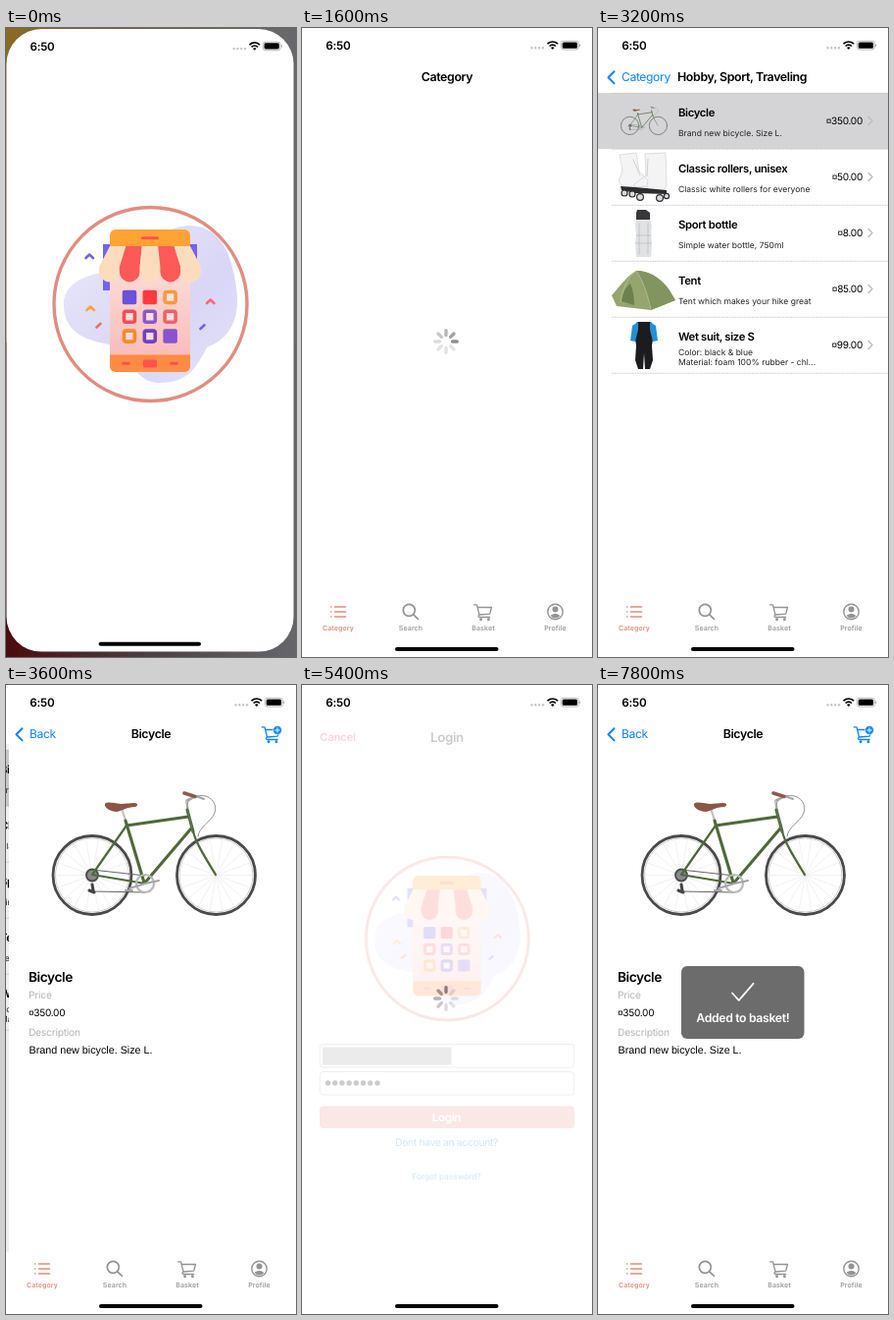
Animation of 296 by 640 pixels, one loop 8 s. Source, as an HTML page:

```html
<!DOCTYPE html>
<html lang="en">
<head>
<meta charset="utf-8">
<title>Shop app walkthrough</title>
<style>
html, body { margin: 0; width: 100%; height: 100%; overflow: hidden; background: #fff; }
svg { display: block; width: 296px; height: 640px; }
text { font-family: Inter, sans-serif; letter-spacing: -.03em; white-space: pre; text-rendering: geometricPrecision; }
.mid { text-anchor: middle; }
.end { text-anchor: end; }
.nav { font-size: 12.4px; }
.nav.blue { font-size: 12.1px; }
.bold { font-weight: 600; }
.blue { fill: #0a84ff; }
.row { font-size: 11.3px; font-weight: 600; }
.note { font-size: 8.55px; letter-spacing: 0; fill: #222; }
.price { font-size: 10.1px; }
.coin { font-family: "Liberation Sans", sans-serif; }
.label { font-size: 10.2px; letter-spacing: -.02em; fill: #b4b4b6; }
.body { font: 10.75px "Liberation Sans", sans-serif; letter-spacing: 0; }
.hint { font-size: 12.15px; fill: #c4c4c7; }
.tab { font-size: 7px; font-weight: 600; letter-spacing: .1px; text-anchor: middle; fill: #9b9b9b; }
.line { fill: none; stroke-linecap: round; stroke-linejoin: round; }
</style>
</head>
<body>
<svg viewBox="0 0 296 640">
<defs>
  <linearGradient id="wallTop"><stop stop-color="#8a6a24"/><stop offset=".5" stop-color="#6f6250"/><stop offset="1" stop-color="#68686c"/></linearGradient>
  <linearGradient id="wallLow"><stop stop-color="#4c0c0c"/><stop offset=".5" stop-color="#4a4044"/><stop offset="1" stop-color="#66666a"/></linearGradient>
  <linearGradient id="blob" x2="1" y2="1"><stop stop-color="#ebe9fa"/><stop offset=".6" stop-color="#d9d6f6"/><stop offset="1" stop-color="#e4e1f9"/></linearGradient>
  <linearGradient id="glass" x2="0" y2="1"><stop stop-color="#fde3dc"/><stop offset="1" stop-color="#f9bdbb"/></linearGradient>
  <clipPath id="face"><circle cx="258.5" cy="594" r="6.4"/></clipPath>

  <g id="shop">
    <circle cx="147.5" cy="281" r="98.5" fill="#fff" stroke="#e18d80" stroke-width="3.4"/>
    <path fill="url(#blob)" d="M59 285C56 258 85 250 108 247C125 240 150 205 185 201C222 200 232 235 236 272C238 300 225 318 205 325C195 345 185 362 155 361C130 360 125 330 105 322C85 318 61 312 59 285Z"/>
    <path fill="#7064ea" d="M99 220h8v47h-8zM187 220h8v24h-8z"/>
    <rect x="106" y="205" width="82" height="145" rx="6" fill="#ffa336"/>
    <path fill="url(#glass)" d="M106 222h82v111h-82z"/>
    <path fill="#fd8b43" d="M106 332.500h82v11.500a6 6 0 0 1-6 6h-70a6 6 0 0 1-6-6z"/>
    <path class="line" stroke="#fb5350" stroke-width="3" d="M139.500 213.700h15M119.500 341.300h6M168.500 341.300h6"/>
    <rect x="140" y="337.500" width="14" height="8" rx="1.500" fill="#fb5350"/>
    <g id="awning"></g>
    <g id="tiles"></g>
    <g class="line" stroke-width="2.600">
      <path stroke="#7064ea" d="M81.500 234l3.700-3.500 3.700 3.500M198.500 306l4-3.700"/>
      <path stroke="#fba23c" d="M82.500 287l3.700-3.500 3.700 3.500"/>
      <path stroke="#f76a6c" d="M205 280l3.700-3.500 3.700 3.500M92.500 304.500l4-3.700"/>
    </g>
  </g>

  <g id="bike" class="line">
    <g id="wheel">
      <path id="spokes" stroke="#e2e2e2" stroke-width=".5"/>
      <circle cx="85" cy="193.500" r="40" stroke="#4a4a4c" stroke-width="2.800"/>
      <circle cx="85" cy="193.500" r="37.500" stroke="#cfcfcf" stroke-width="1"/>
    </g>
    <use href="#wheel" x="126.500"/>
    <path stroke="#666" stroke-width="1.200" d="M85 188l54 6M86 210l53 1"/>
    <circle cx="85" cy="193.500" r="6" fill="#88888a" stroke="#4c4c4e" stroke-width="1.800"/>
    <path stroke="#444" stroke-width="3" d="M85 203l1 6M82 209l5 2"/>
    <path stroke="#c4c4c6" stroke-width="2.400" d="M115 125l5 16M183 128l-2-10 5-2"/>
    <path stroke="#4f693a" stroke-width="3.100" d="M119 138l19 63M120 143l63-9M186 146l-47 55M182 127l6 22"/>
    <path stroke="#4f693a" stroke-width="2.200" d="M120 143l-35 50 54 9M188 149c3 12 12 26 23 44"/>
    <path stroke="#777" stroke-width=".8" d="M192 113c14-3 21 8 18 17s-16 14-17 24M185 116c-8 8 2 18 2 34"/>
    <path stroke="#a4a4a6" stroke-width="2" d="M191 113l8 3M182 117l10-4"/>
    <path stroke="#94594b" stroke-width="3.600" d="M179 110l11 3.500"/>
    <path stroke="none" fill="#8d5547" d="M98 121c2-3 9-1 16 0l14-1c4 0 4 3 1 4-9 0-13 4-19 5-6 0-13-4-12-8z"/>
    <circle cx="139" cy="202" r="9" stroke="#b9b9bb" stroke-width="2.200"/>
    <path stroke="#a4a4a6" stroke-width="2" d="M123 207l16-5 14-3M119 209h7"/>
  </g>

  <g id="cart" class="line" stroke-width="1.300">
    <path d="M.7.9h2.800l2.500 10.100 10.700-.8 1.800-6.700H4.200M6 11c-1.600.8-1.200 2.500.3 2.500h10.300"/>
    <circle cx="7.600" cy="15.700" r=".8"/><circle cx="15.400" cy="15.700" r=".8"/>
  </g>
  <path id="back" class="line" stroke="#0a84ff" stroke-width="2" d="M16.500 44.200l-6 6.100 6 6.100"/>
  <g id="spin"></g>
</defs>

<rect width="296" height="320" fill="url(#wallTop)"/>
<rect y="320" width="296" height="320" fill="url(#wallLow)"/>

<g id="screen">
  <rect id="paper" width="296" height="640" fill="#fff"/>

  <g id="splash"><use href="#shop" transform="scale(1.0101) translate(-.5 -1)"/></g>

  <g id="home"><use href="#spin"/></g>

  <g id="list">
    <rect y="60" width="296" height="580" fill="#fff"/>
    <rect id="pressed" y="66" width="296" height="57" fill="#d4d4d6"/>
    <path stroke="#c8c8ca" stroke-width=".8" stroke-dasharray="2 .6" d="M14 66.300h282M14 123.300h282M14 180.300h282M14 237.300h282M14 294.300h282M14 351.300h282"/>
    <use href="#bike" transform="translate(13.200 55.300) scale(.228)"/>
    <g>
      <path fill="#f4f4f5" stroke="#d2d2d5" stroke-width=".7" d="M22 129l17-2 3 19 9 9-1 6-24 2-5-7 4-11zM48 128l21-1 1 33-4 8-28-2-1-7 12-9z"/>
      <path class="line" stroke="#c6c6c8" stroke-width=".8" d="M36 134l7 16M51 133l-1 18"/>
      <path fill="#2c2c2e" d="M23 161l15 1 32 3v4l-32-1-14-3z"/>
      <g fill="#dcdcdf" stroke="#2c2c2e" stroke-width="1.200"><circle cx="27" cy="168" r="3"/><circle cx="35" cy="169" r="3"/><circle cx="43" cy="172" r="3.400"/><circle cx="63" cy="173" r="3.400"/><circle cx="70" cy="171" r="2.600"/></g>
    </g>
    <g>
      <path fill="#38383a" d="M40 185h9l4 3v7H39v-7z"/>
      <path fill="#e0e2e4" d="M39 195h14l2 6-1 9 1 8-1 15H39l-1-15 1-8-1-9z"/>
      <path class="line" stroke="#babdc0" stroke-width=".8" d="M42 199v31M51 199v31M39 211h15M39 219h15"/>
    </g>
    <g>
      <path fill="#94a56f" d="M14 272c8-9 16-20 25-25 12-1 26 8 34 20l6 10-25 10-35-4z"/>
      <path fill="#83955f" d="M39 247c7 10 12 25 15 40l25-10-6-10c-8-12-22-21-34-20z"/>
      <path fill="#6d8050" d="M24 278c1-8 4-14 9-18 3 7 4 14 4 22z"/>
      <path class="line" stroke="#b5bf94" stroke-width=".9" d="M39 247c7 10 12 25 15 40M39 247c-8 6-14 17-16 32"/>
    </g>
    <g>
      <path fill="#1c1c1f" d="M40 299h14l4 6-3 18 1 15-3 9h-5l-1-16-1 16h-5l-3-9 1-15-3-18z"/>
      <path fill="#2390d8" d="M41 299l-6 4-2 15 5 1 3-12zM53 299l6 4 2 15-5 1-3-12z"/>
    </g>
    <g id="rows"></g>
    <rect id="shade" y="60" width="296" height="580"/>
  </g>

  <g id="detail">
    <rect y="60" width="296" height="580" fill="#fff"/>
    <use href="#bike"/>
    <text x="20" y="302" class="bold" font-size="13.700">Bicycle</text>
    <text x="20" y="319" class="label">Price</text>
    <text x="20" y="336.700" class="price"><tspan class="coin">¤</tspan>350.00</text>
    <text x="20" y="357.300" class="label">Description</text>
    <text x="20.500" y="374.500" class="body">Brand new bicycle. Size L.</text>
  </g>

  <text id="navHome" x="148" y="54.300" class="nav bold mid">Category</text>
  <g id="navList">
    <use href="#back"/>
    <text x="24" y="54.300" class="nav blue">Category</text>
    <text x="81" y="54.300" class="nav bold">Hobby, Sport, Traveling</text>
  </g>
  <g id="navDetail">
    <use href="#back"/>
    <text x="24" y="54.300" class="nav blue">Back</text>
    <text x="148" y="54.300" class="nav bold mid">Bicycle</text>
    <g id="add">
      <use href="#cart" x="260.500" y="42" stroke="#0a84ff"/>
      <circle cx="277" cy="46" r="4.500" fill="#0a84ff" stroke="#fff" stroke-width=".6"/>
      <path class="line" stroke="#fff" stroke-width="1" d="M274.800 46h4.400M277 43.800v4.400"/>
    </g>
  </g>

  <g id="tabs">
    <rect y="577" width="296" height="63" fill="#fff"/>
    <g class="line" stroke="#e18d80" stroke-width="1.500"><path d="M33.500 589h11M33.500 594h11M33.500 599h11M29.500 589h.3M29.500 594h.3M29.500 599h.3"/></g>
    <g class="line" stroke="#939393" stroke-width="1.700"><circle cx="109.300" cy="592.300" r="6"/><path d="M113.800 596.800l4.700 4.700"/></g>
    <use href="#cart" x="175" y="586" stroke="#939393"/>
    <circle cx="258.500" cy="594" r="7.700" fill="none" stroke="#939393" stroke-width="1.400"/>
    <g clip-path="url(#face)" fill="#939393"><circle cx="258.500" cy="591.500" r="3"/><ellipse cx="258.500" cy="600" rx="5.600" ry="4"/></g>
    <text x="37" y="612.700" class="tab" style="fill:#e18d80">Category</text>
    <text x="111" y="612.700" class="tab">Search</text>
    <text x="185" y="612.700" class="tab">Basket</text>
    <text x="258.500" y="612.700" class="tab">Profile</text>
  </g>

  <g id="login">
    <rect id="sheet" width="296" height="640" fill="#fff"/>
    <g id="form">
      <text x="18" y="57" class="bold" font-size="11.500" fill="#ff2d55">Cancel</text>
      <text x="148" y="57.600" class="bold mid" font-size="13.400">Login</text>
      <use href="#shop" transform="translate(148.300 258) scale(.842) translate(-147.500 -281)"/>
      <g fill="#fff" stroke="#a2a2a4" stroke-width=".9"><rect x="18.200" y="365.500" width="259.600" height="23.500" rx="3.500"/><rect x="18.200" y="393.500" width="259.600" height="23.500" rx="3.500"/></g>
      <text id="hintMail" x="22.500" y="381.700" class="hint">Enter email to Register or Login</text>
      <text id="hintPass" x="22.500" y="409.700" class="hint">Enter password to Register or Login</text>
      <g id="dots"></g>
      <rect x="18" y="428.500" width="260" height="22.500" rx="3.500" fill="#e18d80"/>
      <text x="147.500" y="443.700" class="bold mid" font-size="11.600" fill="#fff">Login</text>
      <text x="147.500" y="468.800" class="blue mid" font-size="10.300">Dont have an account?</text>
      <text x="147.500" y="503" class="blue mid" font-size="8.300" style="letter-spacing:0">Forgot password?</text>
    </g>
    <rect id="mail" x="21" y="368.500" width="131.500" height="18" fill="#ebebeb"/>
    <g id="busy"><use href="#spin"/></g>
  </g>

  <g id="hud">
    <rect x="85" y="286" width="125.500" height="74" rx="6" fill="#6c6c6c"/>
    <path class="line" stroke="#fff" stroke-width="1.800" d="M137 313.500l6.800 7.300 14.700-17"/>
    <text x="147.800" y="342.500" class="bold mid" font-size="12.300" fill="#fff">Added to basket!</text>
  </g>

  <g id="status">
    <text x="24.300" y="22.200" class="bold" font-size="11.700" style="letter-spacing:-.02em">6:50</text>
    <path class="line" stroke="#c3c3c5" stroke-width="2.400" d="M234.500 20.300h0M238.300 20.300h0M242.100 20.300h0M245.900 20.300h0"/>
    <path fill="none" stroke="#000" stroke-width="1.700" d="M250.500 16.200a7.500 7.500 0 0 1 10.600 0M252.600 18.500a4.500 4.500 0 0 1 6.400 0"/>
    <path d="M255.800 22l-1.800-1.900a2.600 2.600 0 0 1 3.600 0z"/>
    <rect x="264.400" y="13.200" width="18" height="8.800" rx="2.600" fill="none" stroke="#a5a5a7" stroke-width=".8"/>
    <rect x="265.700" y="14.500" width="15.400" height="6.200" rx="1.500"/>
    <path fill="#a5a5a7" d="M283.200 16.200a1.500 1.500 0 0 1 0 2.900z"/>
    <rect x="95" y="630" width="105.500" height="4" rx="2"/>
  </g>
</g>
</svg>
<script>
const $ = id => document.getElementById(id);
const show = (id, alpha) => {
  $(id).style.display = alpha ? '' : 'none';
  $(id).setAttribute('opacity', Number(alpha));
};
const move = (id, x, y = 0) => $(id).setAttribute('transform', `translate(${x} ${y})`);
const repeat = (n, make) => Array.from({ length: n }, (_, i) => make(i)).join('');

// Awning stripes, app tiles and wheel spokes
$('awning').innerHTML = repeat(5, i => {
  const top = 106 + 16.4 * i, low = 95 + 20.8 * i;
  return `<path fill="${i % 2 ? '#fb5a58' : '#fddcbd'}" d="M${top} 222h16.400L${low + 20.8} 243v5a10.400 10.400 0 0 1-20.800 0v-5z"/>`;
});
const tiles = ['#6a52d9', '#fb3b3f', '#f79a3b', '#ef4f5a', '#8a58cc', '#f0606a', '#f58a2a', '#7040c2', '#8753d0'];
$('tiles').innerHTML = repeat(9, i => {
  const solid = [0, 1, 8].includes(i), size = solid ? 14.5 : 11;
  const x = 126 + 20.8 * (i % 3) - size / 2, y = 274 + 19.8 * Math.floor(i / 3) - size / 2;
  const paint = solid ? `fill="${tiles[i]}"` : `fill="#fff" fill-opacity=".35" stroke="${tiles[i]}" stroke-width="3.600"`;
  return `<rect x="${x}" y="${y}" width="${size}" height="${size}" rx="2" ${paint}/>`;
});
$('spokes').setAttribute('d', repeat(18, i => {
  const a = i * Math.PI / 9;
  return `M85 193.500L${85 + 37 * Math.cos(a)} ${193.5 + 37 * Math.sin(a)}`;
}));

const goods = [
  ['Bicycle', '350', 'Brand new bicycle. Size L.'],
  ['Classic rollers, unisex', '50', 'Classic white rollers for everyone'],
  ['Sport bottle', '8', 'Simple water bottle, 750ml'],
  ['Tent', '85', 'Tent which makes your hike great'],
  ['Wet suit, size S', '99', 'Color: black &amp; blue', 'Material: foam 100% rubber - chl...']
];
$('rows').innerHTML = goods.map(([name, price, note, more], i) => {
  const y = 66 + 57 * i;
  return `<text x="82" y="${y + 24}" class="row">${name}</text>
    <text x="82" y="${y + (more ? 39.3 : 44.3)}" class="note">${note}</text>
    ${more ? `<text x="82" y="${y + 49.3}" class="note">${more}</text>` : ''}
    <text x="270" y="${y + 32}" class="price end"><tspan class="coin">¤</tspan>${price}.00</text>
    <path class="line" stroke="#bdbdc1" stroke-width="1.400" d="M276 ${y + 24.5}l4 4-4 4"/>`;
}).join('');
$('dots').innerHTML = repeat(8, i => `<circle cx="${26.5 + 7.2 * i}" cy="405" r="2.700"/>`);
$('spin').innerHTML = repeat(8, i =>
  `<path class="line" stroke="#000" stroke-width="3.400" d="M147 312.500v-4.800" transform="rotate(${i * 45} 147 319)"/>`);
const blades = [...$('spin').children];

// Share of a slide still to go, t ms after it starts
const left = t => {
  const rest = t < 0 ? 1 : Math.exp(-t * .0115);
  return rest < .002 ? 0 : rest;
};

function draw(t) {
  const opening = t < 200;
  $('screen').setAttribute('transform', opening ? 'translate(.5 1) scale(.99)' : '');
  $('paper').setAttribute('rx', opening ? 36 : 0);

  const ready = t >= 600;
  const toList = left(t - 2000), toDetail = left(t - 3200);
  show('splash', !ready);
  show('home', ready && toList > 0);
  show('tabs', ready);
  show('navHome', ready && toList ** 2);
  show('navList', (1 - toList) * toDetail ** 2);
  show('navDetail', 1 - toDetail);
  move('home', -89 * (1 - toList));
  move('navHome', -60 * (1 - toList));
  move('navList', 100 * toList - 60 * (1 - toDetail));
  move('navDetail', 100 * toDetail ** 2);

  show('list', toList < 1 && toDetail > 0);
  move('list', 296 * toList - 89 * (1 - toDetail));
  show('pressed', t >= 3000);
  show('shade', .06 * (1 - toDetail));
  show('detail', toDetail < 1);
  move('detail', 296 * toDetail);
  const tapped = (t >= 4200 && t < 4600) || (t >= 6400 && t < 6800);
  $('add').setAttribute('opacity', tapped ? .3 : 1);

  const rise = left(t - 4411);
  show('login', rise < 1 && t < 6000);
  move('login', 0, t < 5800 ? 640 * rise : 330);
  const mail = t >= 5000, pass = t >= 5200, busy = t >= 5400;
  show('mail', mail);
  show('hintMail', !mail);
  show('hintPass', !pass);
  show('dots', pass);
  show('form', busy ? .2 : 1);
  show('busy', busy && t < 5800);

  show('hud', Math.max(0, Math.min(1, (t - 6600) / 500)));

  const head = Math.floor(t / 100) + 2;
  blades.forEach((b, i) => {
    const age = (head - i + 800) % 8;
    b.setAttribute('opacity', Math.max(.11, .44 - .075 * age));
  });
}

let last = -1;
function tick() {
  const t = Math.floor(performance.now() % 8000 / 200) * 200;
  if (t !== last) draw(last = t);
  requestAnimationFrame(tick);
}
tick();
</script>
</body>
</html>
```
